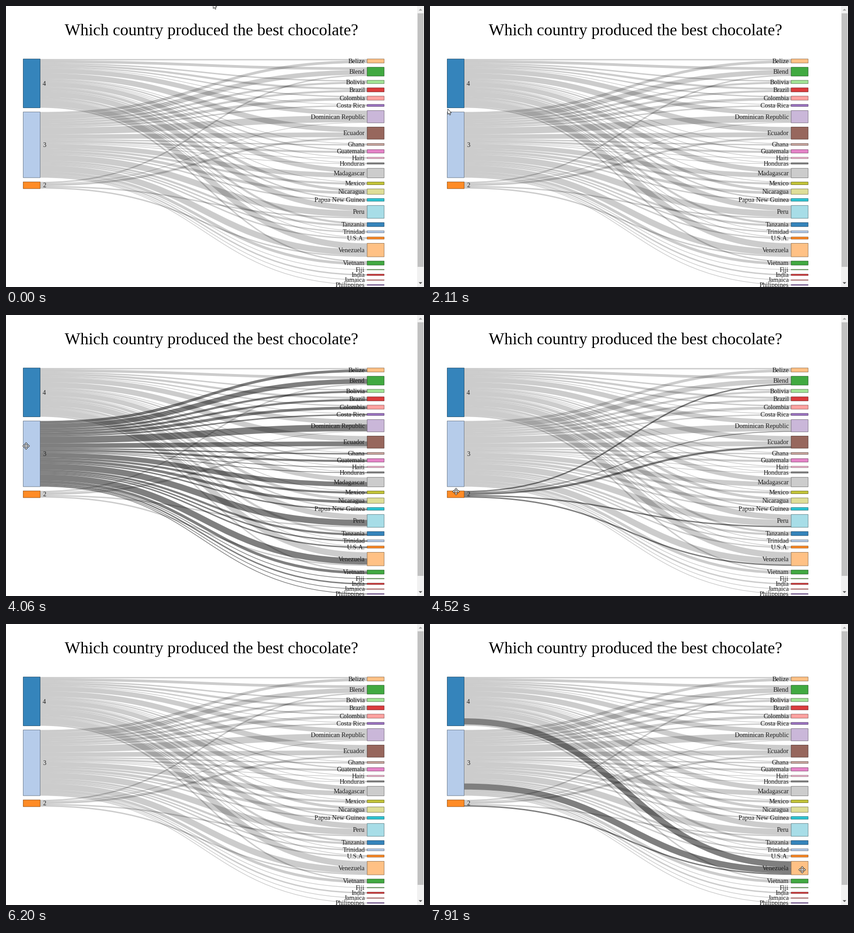
A matplotlib script for the animation above (7990 ms loop, 912 by 614 pixels).

```python
import math

import matplotlib.pyplot as plt
from matplotlib.animation import FuncAnimation
from matplotlib.collections import PathCollection
from matplotlib.patches import Polygon, Rectangle
from matplotlib.path import Path

W, H, DPI = 912, 614, 64
LOOP, STEP = 7990, 34
PT = 72 / DPI  # points per pixel

TOP, UNIT, PAD = 115.8, 1.48, 9.18
NODE_W, LEFT, RIGHT = 37, 37.5, 788
BASE, ACTIVE = 0.2, 0.5

RATINGS = ["4", "3", "2"]
# bars awarded each rating, in the order of RATINGS
COUNTRIES = {
    "Belize": (2, 4), "Blend": (4, 7, 2), "Bolivia": (2, 3), "Brazil": (3, 3),
    "Colombia": (2, 4), "Costa Rica": (1, 2), "Dominican Republic": (7, 10, 1),
    "Ecuador": (8, 7, 3), "Ghana": (1, 2), "Guatemala": (2, 3),
    "Haiti": (1, 1), "Honduras": (1, 1), "Madagascar": (7, 7),
    "Mexico": (1, 3), "Nicaragua": (4, 4), "Papua New Guinea": (2, 2),
    "Peru": (8, 9, 2), "Tanzania": (3, 3), "Trinidad": (1, 2),
    "U.S.A.": (1, 2), "Venezuela": (9, 9, 2), "Vietnam": (2, 4),
    "Fiji": (0, 1), "India": (0, 2), "Jamaica": (0, 1), "Philippines": (0, 1),
}

fig = plt.figure(figsize=(W / DPI, H / DPI), dpi=DPI, facecolor="white")
ax = fig.add_axes([0, 0, 1, 1])
ax.set(xlim=(0, W), ylim=(H, 0))
ax.axis("off")


def stack(names, totals, x):
    """Place a column of nodes as name -> (x, y, height)."""
    nodes, y = {}, TOP
    for name, total in zip(names, totals):
        nodes[name] = (x, y, total * UNIT)
        y += total * UNIT + PAD
    return nodes


def ribbon(y0, y1):
    x0, x1 = LEFT + NODE_W, RIGHT
    mid = (x0 + x1) / 2
    return Path([(x0, y0), (mid, y0), (mid, y1), (x1, y1)],
                [Path.MOVETO] + [Path.CURVE4] * 3)


def label(x, y, s, px, **kw):
    ax.text(x, y, s, family="Liberation Serif", fontsize=px * PT,
            va="baseline", **kw)


sums = [sum(v[i] for v in COUNTRIES.values() if i < len(v)) for i in range(3)]
nodes = stack(RATINGS, sums, LEFT)
nodes.update(stack(COUNTRIES, map(sum, COUNTRIES.values()), RIGHT))

# links
ends, paths, widths = [], [], []
out = {r: nodes[r][1] for r in RATINGS}
for name, counts in COUNTRIES.items():
    y1 = nodes[name][1]
    for rating, count in zip(RATINGS, counts):
        if not count:
            continue
        h = count * UNIT
        ends.append((rating, name))
        paths.append(ribbon(out[rating] + h / 2, y1 + h / 2))
        widths.append(h * PT)
        out[rating] += h
        y1 += h
links = PathCollection(paths, facecolors="none", linewidths=widths,
                       capstyle="butt", zorder=1)
ax.add_collection(links, autolim=False)

# nodes and labels
for i, (name, (x, y, h)) in enumerate(nodes.items()):
    color = plt.cm.tab20(i % 20)[:3]
    edge = [c * 0.49 for c in color]
    ax.add_patch(Rectangle((x, y), NODE_W, h, fc=(*color, 0.9), ec=edge,
                           lw=0.8 * PT, snap=False, zorder=2))
    base = y + h / 2 + 4.6
    if x == LEFT:
        label(x + NODE_W + 5.5, base, name, 14.2, color="#222222")
    else:
        label(x - 5, base, name, 14.2, ha="right", color="#1a1a1a")

label(448, 64.5, "Which country produced the best chocolate?", 36,
      ha="center", color="black")

# scrollbar
ax.add_patch(Rectangle((897, 0), 15, H, fc="#f1f1f1", lw=0, zorder=4))
thumb = ax.add_patch(Rectangle((898, 16), 13, 554, lw=0, zorder=5))
for y, tip, color in ((10, 6, "#a3a3a3"), (603.5, 607.5, "#505050")):
    ax.add_patch(Polygon([(900.3, y), (908.3, y), (904.3, tip)],
                         fc=color, lw=0, zorder=5))

# pointers
ARROW = [(0, 0), (0, 11.5), (2.6, 9.2), (4.4, 13.2), (6.2, 12.4),
         (4.5, 8.5), (8, 8.3)]
ARM = [(-1.1, -1.1), (-1.1, -4.2), (-3.1, -4.2), (0, -7.6), (3.1, -4.2),
       (1.1, -4.2)]
MOVE = []
for _ in range(4):
    MOVE += ARM
    ARM = [(-y, x) for x, y in ARM]
pointer = ax.add_patch(Polygon(ARROW, fc="white", ec="#222222",
                               lw=0.9 * PT, zorder=9))


def smooth(s):
    return s * s * (3 - 2 * s)


def ease_out(s):
    return 1 - (1 - s) ** 1.6


# start, end, steps, bezier points, easing
MOVES = [
    (160, 890, 10, ((452, -6), (80, 110), (42, 146)), smooth),
    (1780, 2400, 9, ((42, 146), (36, 215), (41, 280)), smooth),
    (4060, 4670, 9, ((41, 280), (85, 372), (49, 392)), smooth),
    (5570, 6200, 9, ((49, 392), (38, 463), (60, 660)), smooth),
    (6610, 7000, 6, ((945, 571), (878, 553.5), (811, 536)), ease_out),
    (7910, 7911, 1, ((811, 536), (811, 536), (812, 537)), smooth),
]


def cursor_at(t):
    pos = MOVES[0][3][0]
    for t0, t1, n, (a, b, c), ease in MOVES:
        if t < t0:
            break
        k = min(n, 1 + math.floor((t - t0) / (t1 - t0) * (n - 1) + 1e-6))
        p = ease(k / n)
        q = 1 - p
        pos = tuple(q * q * u + 2 * p * q * v + p * p * w
                    for u, v, w in zip(a, b, c))
    return pos


def node_at(px, py):
    for name, (x, y, h) in nodes.items():
        if x <= px <= x + NODE_W and y <= py <= y + h:
            return name
    return None


def draw(i):
    x, y = cursor_at((i + 1) * STEP)
    hot = node_at(x, y)
    links.set_edgecolor([(0, 0, 0, ACTIVE if hot in e else BASE)
                         for e in ends])
    pointer.set_xy([(x + dx, y + dy) for dx, dy in (MOVE if hot else ARROW)])
    over = 897 <= x < W and 16 <= y <= 570
    thumb.set_facecolor("#a8a8a8" if over else "#c1c1c1")
    return links, pointer, thumb


anim = FuncAnimation(fig, draw, frames=LOOP // STEP, interval=STEP,
                     repeat=True, repeat_delay=0)
plt.show()
```
